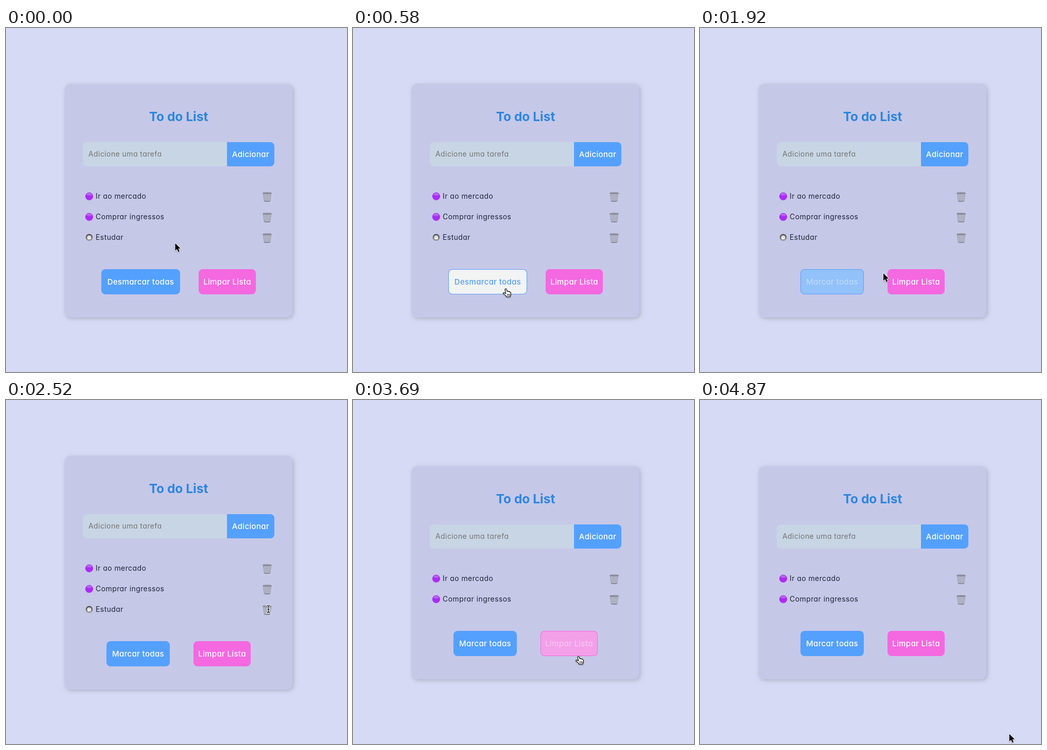
Recreate the animation shown at these times as an HTML page with a canvas. Size 662 by 669 pixels, loop 4890 ms.

```html
<!DOCTYPE html>
<html lang="pt">
<head>
<meta charset="utf-8">
<title>To do List</title>
<style>
html, body { margin: 0; width: 100%; height: 100%; overflow: hidden; background: #d6daf4; }
canvas, svg { position: absolute; left: 0; top: 0; width: 662px; height: 669px; }
text { font-family: Poppins, Inter, sans-serif; font-feature-settings: "cv11"; }
.title { font-size: 24.5px; font-weight: 700; text-anchor: middle; }
.item { font-size: 14px; letter-spacing: .42px; }
.button { font-size: 15px; font-weight: 500; letter-spacing: .35px; text-anchor: middle; }
</style>
</head>
<body>
<canvas id="shapes" width="662" height="669"></canvas>
<svg id="labels" viewBox="0 0 662 669"></svg>
<canvas id="cursor" width="662" height="669"></canvas>
<script>
const ctx = document.getElementById('shapes').getContext('2d');
const over = document.getElementById('cursor').getContext('2d');
const labels = document.getElementById('labels');
const LOOP = 4890;
const RENAMED = 1630, REMOVED = 2660;
const BLUE = [84, 160, 255], PINK = [244, 104, 224];
const WHITE = [255, 255, 255], PALE = [242, 243, 243];

// time, x, y, pointer kind, hover strength
const STEPS = [
  [0, 328.5, 418.5, 'arrow', 0],
  [290, 318, 450, 'arrow', 0],
  [440, 302, 492, 'hand', 0.4],
  [580, 296.5, 506.5, 'hand', 1],
  [730, 296.5, 507.5, 'hand', 1],
  [1030, 298, 506, 'hand', 1],
  [1180, 302, 503, 'hand', 1],
  [1330, 307, 500, 'hand', 1],
  [1630, 319.5, 497.5, 'arrow', 1],
  [1780, 356, 477, 'arrow', 0.4],
  [1930, 405, 451, 'arrow', 0],
  [2070, 450, 430, 'arrow', 0],
  [2220, 482, 415, 'arrow', 0],
  [2370, 504, 408, 'beam', 0],
  [2520, 509.5, 406.5, 'beam', 0],
  [2660, 507, 403, 'arrow', 0],
  [3110, 426.5, 340.5, 'arrow', 0],
  [3260, 408, 271, 'beam', 0],
  [3400, 412, 330, 'arrow', 0],
  [3550, 424, 425, 'arrow', 0],
  [3690, 437.5, 497.5, 'hand', 0.4],
  [3840, 466, 543, 'arrow', 0.5],
  [3990, 500, 590, 'arrow', 0],
  [4140, 526, 622, 'arrow', 0],
  [4430, 546, 638, 'arrow', 0],
  [4580, 568, 650, 'arrow', 0],
  [4720, 588, 652, 'arrow', 0],
  [4870, 600.5, 649.5, 'arrow', 0]
];

const ARROW = new Path2D('M0 0V14.5L3.4 11.5L5.8 16.9L8.3 15.8L6 10.6L10.3 10.3Z');
const HAND = new Path2D('M-1.4 1.5Q0 -.4 1.5 1.4L2.7 5.6Q4 4.7 5 6Q6.6 5.2 7.5 6.8Q9.4 6.3 9.7 8.3L10 12L8.5 16.3H1.6L0 13.9L-4.6 10.3Q-5.5 8.2 -3.2 8.2L.2 10Z');
const KNUCKLES = new Path2D('M3.2 11V14M5.4 11V14M7.4 11V14');
const BEAM = new Path2D('M-3 -7Q0 -7 0 -5V5Q0 7 -3 7M3 -7Q0 -7 0 -5M0 5Q0 7 3 7M-1.8 1H1.8');

const rgb = c => `rgb(${c.map(Math.round)})`;
const mix = (a, b, k) => a.map((v, i) => v + (b[i] - v) * k);

function box(x, y, w, h, r, fill) {
  ctx.beginPath();
  ctx.roundRect(x, y, w, h, r);
  ctx.fillStyle = fill;
  ctx.fill();
}

function disc(x, y, r, fill) {
  ctx.beginPath();
  ctx.arc(x, y, r, 0, 7);
  ctx.fillStyle = fill;
  ctx.fill();
}

function ramp(y0, y1, ...colors) {
  const g = ctx.createLinearGradient(0, y0, 0, y1);
  colors.forEach((c, i) => g.addColorStop(i / (colors.length - 1), c));
  return g;
}

function text(str, x, y, style, color) {
  const el = document.createElementNS('http://www.w3.org/2000/svg', 'text');
  const attrs = { x, y, class: style, fill: color };
  for (const name in attrs) el.setAttribute(name, attrs[name]);
  el.textContent = str;
  labels.append(el);
}

function button(label, x, y, w, h, radius, color, hover = 0) {
  box(x, y, w, h, radius, rgb(color));
  if (hover) box(x + 1, y + 1, w - 2, h - 2, radius - 1, rgb(mix(color, PALE, hover)));
  text(label, x + w / 2, y + h / 2 + 5.5, 'button', rgb(mix(WHITE, color, hover)));
}

function bullet(x, y) {
  disc(x, y, 7.6, ramp(y - 7.6, y + 7.6, '#962bdc', '#a62bf8', '#b32cff'));
  ctx.beginPath();
  ctx.ellipse(x, y - 3.6, 5.4, 2.8, 0, 0, 7);
  ctx.fillStyle = ramp(y - 7, y, '#cb7cfb', '#ac3afa');
  ctx.fill();
}

function radio(x, y) {
  disc(x, y, 6.9, ramp(y - 7, y + 7, '#48484b', '#77777a', '#a9a9ae'));
  disc(x, y, 4.8, '#77777a');
  disc(x, y, 3.9, ramp(y - 4, y + 4, '#d2d2d4', '#f8f8f8'));
}

function trash(x, y) {
  const can = new Path2D('M-8 -7.5L-5.8 8Q0 9.6 5.8 8L8 -7.5Z');
  ctx.save();
  ctx.translate(x, y);
  ctx.fillStyle = '#b9bacc';
  ctx.fill(can);
  ctx.save();
  ctx.clip(can);
  ctx.beginPath();
  for (let i = -24; i < 25; i += 3) {
    ctx.moveTo(i, -9);
    ctx.lineTo(i + 9, 10);
    ctx.moveTo(i, -9);
    ctx.lineTo(i - 9, 10);
  }
  ctx.strokeStyle = 'rgba(120,121,134,.32)';
  ctx.lineWidth = 0.7;
  ctx.stroke();
  ctx.restore();
  ctx.strokeStyle = '#9b9ca9';
  ctx.lineWidth = 0.8;
  ctx.stroke(can);
  ctx.strokeStyle = '#777881';
  ctx.lineWidth = 1.3;
  ctx.stroke(new Path2D('M-5.6 8Q0 9.6 5.6 8'));
  ctx.beginPath();
  ctx.ellipse(0, -7.4, 8.5, 1.2, 0, 0, 7);
  ctx.fillStyle = '#9b9ca7';
  ctx.fill();
  ctx.lineWidth = 0.9;
  ctx.stroke();
  ctx.restore();
}

function outline(path, color, width) {
  over.strokeStyle = color;
  over.lineWidth = width;
  over.stroke(path);
}

function pointer(kind, x, y) {
  over.clearRect(0, 0, 662, 669);
  over.save();
  over.translate(x, y);
  over.lineJoin = over.lineCap = 'round';
  if (kind === 'beam') {
    outline(BEAM, '#fff', 3);
    outline(BEAM, '#000', 1.2);
  } else {
    const hand = kind === 'hand';
    const path = hand ? HAND : ARROW;
    over.save();
    over.shadowColor = 'rgba(0,0,0,.3)';
    over.shadowBlur = 2;
    over.shadowOffsetY = 1;
    outline(path, '#fff', 2);
    over.restore();
    over.fillStyle = hand ? '#fff' : '#000';
    over.fill(path);
    if (hand) {
      outline(path, '#000', 1.2);
      outline(KNUCKLES, '#000', 0.9);
    }
  }
  over.restore();
}

function draw([t, px, py, kind, hover]) {
  const removed = t >= REMOVED, renamed = t >= RENAMED;
  const items = ['Ir ao mercado', 'Comprar ingressos'];
  if (!removed) items.push('Estudar');
  const top = removed ? 129 : 109;
  const height = 334 + items.length * 40;

  labels.replaceChildren();
  ctx.fillStyle = '#d6daf4';
  ctx.fillRect(0, 0, 662, 669);
  ctx.save();
  ctx.shadowColor = 'rgba(0,0,0,.2)';
  ctx.shadowBlur = 8;
  ctx.shadowOffsetX = ctx.shadowOffsetY = 2;
  box(114, top, 442, height, 11, '#c6c8e8');
  ctx.restore();

  text('To do List', 335, top + 72, 'title', '#2b86df');
  box(149, top + 113, 280, 47, [8, 0, 0, 8], '#c8d5e4');
  text('Adicione uma tarefa', 160, top + 141, 'item', '#757575');
  button('Adicionar', 429, top + 113, 92, 47, [0, 8, 8, 0], BLUE);

  items.forEach((item, i) => {
    const y = top + 218 + i * 40;
    (item === 'Estudar' ? radio : bullet)(161.5, y + 0.4);
    text(item, 174, y + 5, 'item', '#212539');
    trash(507, y + 1.6);
  });

  const y = top + height - 94;
  const [label, x, w, gap] = renamed ? ['Marcar todas', 195, 123, 46] : ['Desmarcar todas', 185, 153, 36];
  button(label, x, y, w, 49, 8, BLUE, removed ? 0 : hover);
  button('Limpar Lista', x + w + gap, y, 111, 49, 8, PINK, removed ? hover : 0);
  pointer(kind, px, py);
}

const start = performance.now();
let shown;
function tick() {
  const t = (performance.now() - start) % LOOP;
  const step = STEPS.findLast(s => s[0] <= t);
  if (step !== shown) draw(shown = step);
  requestAnimationFrame(tick);
}
tick();
</script>
</body>
</html>
```
